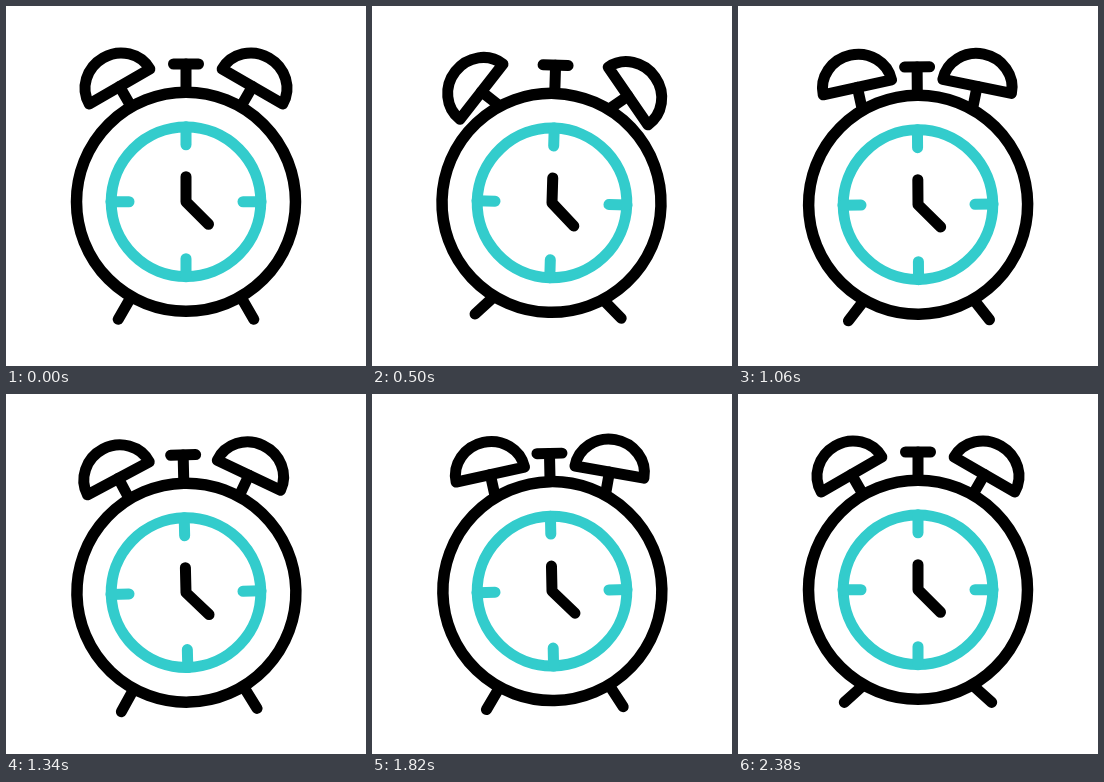
Recreate the animation shown at these times as an HTML page with a canvas. Size 360x360 px, loop 2400 ms.

```html
<!DOCTYPE html>
<html lang="en">
<head>
<meta charset="utf-8">
<title>Alarm clock</title>
<style>
html, body { margin: 0; width: 100%; height: 100%; overflow: hidden; background: #fff; }
canvas { display: block; width: 360px; height: 360px; }
</style>
</head>
<body>
<canvas id="stage" width="360" height="360"></canvas>
<script>
const ctx = document.getElementById('stage').getContext('2d');
const LOOP = 2400, STEP = 20, LAST = 119;
const INK = '#000', TEAL = '#33cccc';
const TAU = Math.PI * 2;
const rad = deg => deg * Math.PI / 180;

// Shake phases, in cycles, reached at each beat
const BEATS = [0, 25, 36, 53, 80, 102, 119];
const BODY_CYCLES = [0, 4.25, 5.75, 8.54, 13, 16.75, 19.5];
const LEG_CYCLES = [0, 3.61, 5.31, 7.77, 12, 15.8, 18.5];

// Bell swing limits, in degrees
const INWARD = -21.5, OUTWARD = 24.5;

function phase(step, cycles) {
  let i = 1;
  while (i < BEATS.length - 1 && step > BEATS[i]) i++;
  const k = (step - BEATS[i - 1]) / (BEATS[i] - BEATS[i - 1]);
  return TAU * (cycles[i - 1] + k * (cycles[i] - cycles[i - 1]));
}

// Linear swing between both limits that starts and ends at rest
function bellAngle(step) {
  const swings = 38, q = step * swings / LAST;
  const edge = Math.min(q, swings - q);
  if (edge < 1) return INWARD * edge;
  return INWARD + (OUTWARD - INWARD) * 2 * Math.abs((q / 2) % 1 - 0.5);
}

function line(...points) {
  ctx.beginPath();
  for (let i = 0; i < points.length; i += 2) ctx.lineTo(points[i], points[i + 1]);
  ctx.stroke();
}

function circle(y, radius, color, width) {
  ctx.strokeStyle = color;
  ctx.lineWidth = width;
  ctx.beginPath();
  ctx.arc(0, y, radius, 0, TAU);
  ctx.stroke();
}

function pivot(x, y, angle, paint) {
  ctx.save();
  ctx.translate(x, y);
  ctx.rotate(rad(angle));
  paint();
  ctx.restore();
}

function bell() {
  line(0, 0, 0, -22.5);
  ctx.beginPath();
  ctx.ellipse(0, -22.5, 35, 33, 0, Math.PI, TAU);
  ctx.closePath();
  ctx.stroke();
}

function body(bellSwing, legSwing) {
  circle(17, 109.5, INK, 11.5);
  ctx.lineWidth = 11;
  line(-12.5, -120.75, 12.5, -120.75);
  line(0, -120.75, 0, -93);
  for (const side of [1, -1]) {
    ctx.save();
    ctx.scale(side, 1);
    pivot(-55.2, -78.75, -30 - bellSwing, bell);
    pivot(-55.5, 113.25, 30 + legSwing, () => line(0, 0, 0, 24.5));
    ctx.restore();
  }
}

function face() {
  circle(0, 74.8, TEAL, 11);
  for (let i = 0; i < 4; i++) pivot(0, 0, i * 90, () => line(0, -75, 0, -57));
  ctx.strokeStyle = INK;
  line(0, -25, 0, 0, 22.5, 22.5);
}

function draw(step) {
  const drift = 1.5 * (1 - Math.cos(TAU * step / LAST));
  const tilt = 1.7 * Math.sin(phase(step, BODY_CYCLES));
  const legSwing = 9 * (1 - Math.cos(phase(step, LEG_CYCLES)));

  ctx.fillStyle = '#fff';
  ctx.fillRect(0, 0, 360, 360);
  ctx.lineCap = ctx.lineJoin = 'round';

  // The body rocks about its own middle, the face about the dial centre
  pivot(180, 178.75 + drift, tilt, () => body(bellAngle(step), legSwing));
  ctx.lineWidth = 11;
  pivot(180, 195.75 + drift, tilt, face);
}

function tick() {
  draw(Math.floor((performance.now() % LOOP) / STEP));
  requestAnimationFrame(tick);
}
tick();
</script>
</body>
</html>
```
